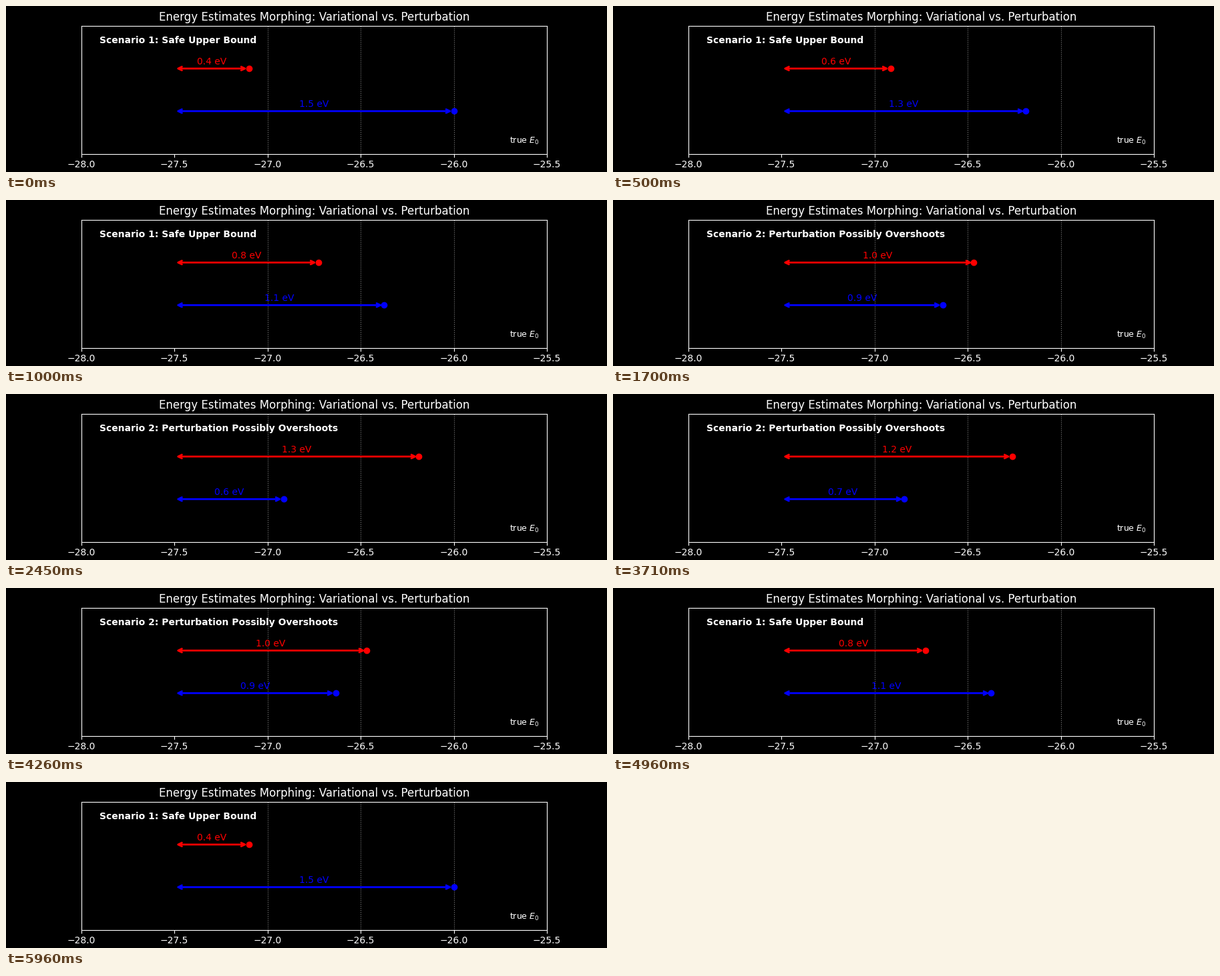
Write a matplotlib script that moves like this. It is 900 px wide and 250 px high and loops after 6.01 s.

```python
import matplotlib.pyplot as plt
from matplotlib.animation import FuncAnimation

E0 = -27.5          # true ground-state energy
LOW, HIGH = -27.1, -26.0
STEPS = 60          # poses in each direction
TICK = 10           # ms
LOOP = 6010         # ms
TITLES = ("Scenario 1: Safe Upper Bound",
          "Scenario 2: Perturbation Possibly Overshoots")

plt.style.use("dark_background")
plt.rcParams["font.family"] = "DejaVu Sans"

fig, ax = plt.subplots(figsize=(9, 2.5), dpi=100)
ax.set_xlim(-28, -25.5)
ax.set_ylim(0, 3)
ax.set_yticks([])
ax.set_title("Energy Estimates Morphing: Variational vs. Perturbation")
for x in (-27, -26.5, -26):
    ax.axvline(x, color="white", ls=":", lw=0.8, alpha=0.5, zorder=1)
ax.text(-25.7, 0.25, "true $E_0$", fontsize=9)
scenario = ax.text(-27.9, 2.6, TITLES[0], weight="bold")


class Estimate:
    """Dot, double arrow back to E0 and the gap in eV."""

    def __init__(self, y, color):
        self.y = y
        self.dot, = ax.plot([E0], [y], "o", color=color)
        self.arrow = ax.annotate(
            "", xy=(E0, y), xytext=(E0, y),
            arrowprops=dict(arrowstyle="<->", color=color, lw=2))
        self.label = ax.text(E0, y + 0.1, "", color=color, ha="center")

    def move(self, energy):
        self.dot.set_data([energy], [self.y])
        self.arrow.xy = (energy, self.y)
        self.label.set_x((E0 + energy) / 2)
        self.label.set_text(f"{energy - E0:.1f} eV")


red = Estimate(2, "red")
blue = Estimate(1, "blue")


def update(i):
    t = i * TICK
    if t > LOOP // 2:
        t -= TICK   # the turning pose holds one tick longer
    n = t // 50
    s = min(n, 2 * STEPS - 1 - n) / (STEPS - 1)
    red.move(LOW + s * (HIGH - LOW))
    blue.move(HIGH + s * (LOW - HIGH))
    scenario.set_text(TITLES[s > 0.5])


anim = FuncAnimation(fig, update, frames=LOOP // TICK, interval=TICK,
                     init_func=lambda: update(0), repeat=True,
                     repeat_delay=0, cache_frame_data=False)
plt.show()
```
